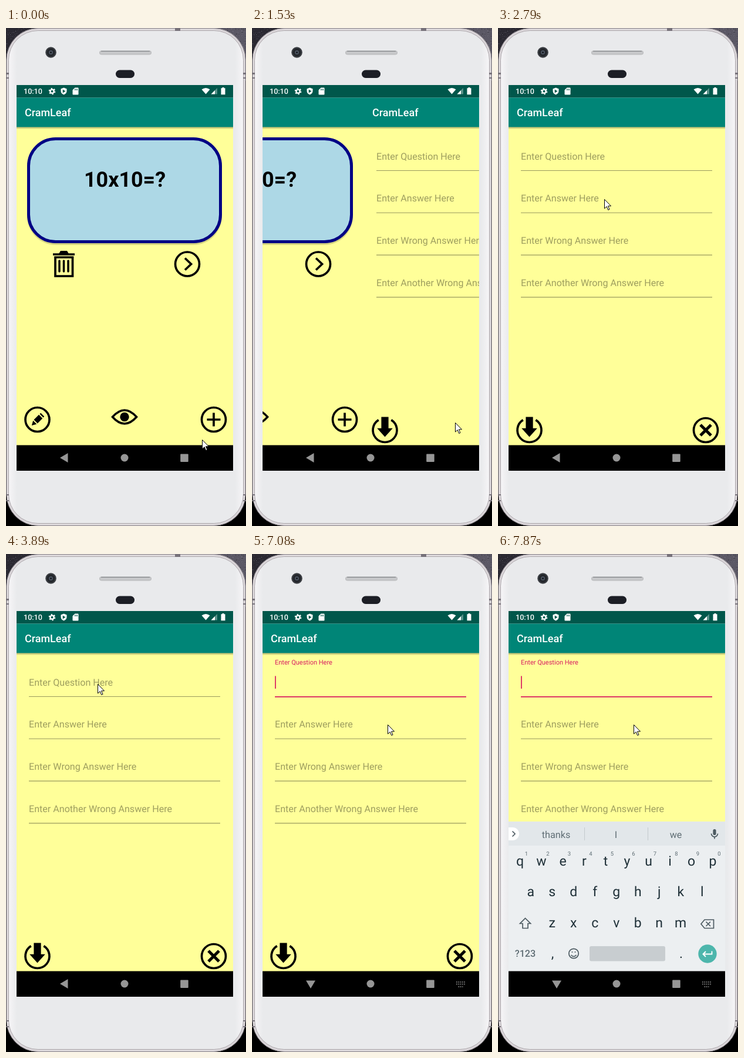
These frames come from a looping animation (409x847 px, 8 s). An HTML page:

```html
<!DOCTYPE html>
<html lang="en">
<head>
<meta charset="utf-8">
<title>Flash cards</title>
<style>
  html, body { margin: 0; width: 100%; height: 100%; overflow: hidden; background: #000; }
  svg { display: block; width: 100%; height: 100%; }
  text { font-family: Roboto, sans-serif; text-rendering: geometricPrecision; white-space: pre; }
  .mid { text-anchor: middle; }
  .icon { fill: none; stroke: #000; stroke-width: 3.7; }
  .solid { fill: #000; stroke: none; }
  .hint { font-size: 16.1px; fill: #9e9e5f; }
  .title { font-size: 17.96px; font-weight: 500; fill: #fff; }
  .key { font-size: 23px; fill: #1f3038; }
  .small { font-size: 9.5px; fill: #5f6d74; }
  .word { font-size: 16.2px; fill: #5f6d74; }
  .glyph { fill: none; stroke: #4c5a61; stroke-width: 1.7; }
</style>
</head>
<body>
<svg viewBox="0 0 409 847" preserveAspectRatio="none">
  <defs>
    <linearGradient id="shade" x2="0" y2="1">
      <stop stop-color="#000" stop-opacity=".3"/>
      <stop offset="1" stop-color="#000" stop-opacity="0"/>
    </linearGradient>
    <linearGradient id="face">
      <stop stop-color="#f6f5f7"/>
      <stop offset=".035" stop-color="#e9eaec"/>
      <stop offset=".965" stop-color="#e9eaec"/>
      <stop offset="1" stop-color="#f6f5f7"/>
    </linearGradient>
    <clipPath id="view"><path d="M18 118h369v592H18z"/></clipPath>
  </defs>

  <!-- wallpaper and phone -->
  <path fill="#2b2932" d="M0 0h205v90H0z"/>
  <path fill="#5b5865" d="M205 0h204v90H205z"/>
  <g id="grain"></g>
  <path d="M0 780h409v67H0z"/>
  <rect x=".8" y=".5" width="407.400" height="846" rx="54" fill="#d2cdd1" stroke="#8f8a8f"/>
  <rect x="2.500" y="2.500" width="404" height="842" rx="52" fill="none" stroke="#e6e2e5"/>
  <rect x="4.500" y="4.500" width="400" height="838" rx="50" fill="url(#face)" stroke="#b3aeb2"/>
  <path fill="#77727a" d="M288 0h9v5h-9zM0 76h5v3H0zM0 84h5v2H0zM404 76h5v3h-5zM404 84h5v2h-5zM0 793h5v2H0zM0 803h5v2H0zM404 793h5v2h-5zM404 803h5v2h-5z"/>
  <circle cx="76.500" cy="41.500" r="9.300" fill="#3b3e43"/>
  <circle cx="76.500" cy="41.500" r="7" fill="#23262b"/>
  <circle cx="76.500" cy="41.500" r="3.500" fill="#4b5360"/>
  <circle cx="76.500" cy="41.500" r="1.600" fill="#16191d"/>
  <rect x="159.300" y="38.800" width="88.400" height="6.400" rx="3.200" fill="#c6c7c9" stroke="#b4b5b7" stroke-width=".7"/>
  <path stroke="#7d7f82" d="M162 39.500h83"/>
  <rect x="187" y="71.500" width="32" height="13.500" rx="6.700" fill="#1c1e25"/>

  <!-- status bar -->
  <path fill="#00574b" d="M18 97h369v21.500H18z"/>
  <text x="30" y="112.200" font-size="12.57" font-weight="500" fill="#fff">10:10</text>
  <g fill="#fff">
    <circle cx="78.500" cy="107.700" r="3.100" fill="none" stroke="#fff" stroke-width="2.400"/>
    <circle cx="78.500" cy="107.700" r="4.900" fill="none" stroke="#fff" stroke-width="1.800" stroke-dasharray="2.5 2.63"/>
    <path fill-rule="evenodd" d="M98.500 101.500l5 2v3.600q0 4.600-5 6.400q-5-1.800-5-6.400v-3.600zM96.700 104.500v6l4.600-3z"/>
    <path fill-rule="evenodd" d="M117.500 101.500h5q1 0 1 1v10q0 1-1 1h-8q-1 0-1-1v-7zM117 103.500v2.500h1v-2.500zm2 0v2.500h1v-2.500zm2 0v2.500h1v-2.500z"/>
    <path d="M333.500 104.500q7-5 14 0l-7 8z"/>
    <path d="M360 102v10.500h-10.500z" opacity=".35"/>
    <path d="M356 106v6.500h-6.500z"/>
    <path d="M368.500 101h3v1.200h2v11h-7v-11h2z"/>
  </g>

  <!-- app -->
  <g clip-path="url(#view)">
    <path fill="#ff9" d="M18 168h369v542H18z"/>
    <path fill="#008577" d="M18 118.500h369v50H18z"/>
    <path fill="url(#shade)" d="M18 168.500h369v4H18z"/>

    <g id="deck">
      <text class="title" x="32" y="150">CramLeaf</text>
      <rect x="36" y="188" width="332" height="181" rx="49" opacity=".16"/>
      <rect x="38.500" y="188.500" width="327" height="175" rx="46" fill="#add8e6" stroke="#000084" stroke-width="5"/>
      <text class="mid" x="202.500" y="269.500" font-size="35.9" font-weight="700">10x10=?</text>
      <g class="icon">
        <path d="M80 385h37M84 390v32h29.500v-32z"/>
        <path class="solid" d="M90 384l3-5h11l3 5z"/>
        <path stroke-width="3.500" stroke-linecap="round" d="M91 396v18M98.500 396v18M106 396v18"/>
        <circle cx="309" cy="401.500" r="20.500"/>
        <path d="M305 391.500l10.500 10-10.500 10"/>
        <circle cx="53.500" cy="666" r="20.500"/>
        <path class="solid" d="M43.800 676l2.400-8.300 6 6zM47.500 666.300l8.500-8.500 6.200 6.200-8.500 8.500zM57.500 656.400l1.700-1.600 6 6-1.700 1.700z"/>
        <path stroke-width="3.500" d="M181.500 661.500q20.500-23 41 0q-20.500 23-41 0z"/>
        <circle class="solid" cx="202" cy="661.500" r="7.700"/>
        <circle cx="354" cy="666" r="20.500"/>
        <path d="M342.500 666h23M354 654.500v23"/>
      </g>
    </g>

    <g id="form">
      <path fill="#ff9" d="M18 172.500h369v537.500H18z"/>
      <text class="title" x="32" y="150">CramLeaf</text>
      <g id="fields"></g>
      <path id="focus" stroke="#d81b60" stroke-width="1.700" d="M39 242.800h326"/>
      <path id="caret" stroke="#d81b60" stroke-width="1.700" d="M39.900 207.500v21.500"/>
      <g class="icon">
        <path d="M42.700 666.600a20.500 20.500 0 1 0 21.600 0"/>
        <path class="solid" d="M47.400 661.500h12.200v19.300h7.200l-13.300 14.700-13.300-14.700h7.200z"/>
        <circle cx="354" cy="684" r="20.500"/>
        <path stroke-width="5" d="M345 675l18 18M363 675l-18 18"/>
      </g>
    </g>

    <g id="board">
      <path fill="#eceff1" d="M18 455h369v320H18z"/>
      <path fill="#e2e7ea" d="M18 455h369v41H18z"/>
      <path fill="#fff" d="M18 465h7a11 11 0 0 1 0 22h-7z"/>
      <path class="glyph" d="M24.500 471.500l4.500 4.500-4.500 4.500"/>
      <path stroke="#c3cacd" d="M147.500 465v22M255.500 465v22"/>
      <rect x="366.400" y="468" width="5.200" height="10" rx="2.600" fill="#4c5a61"/>
      <path class="glyph" stroke-width="1.500" d="M363.500 475.500a5.500 5.500 0 0 0 11 0M369 481v3.500"/>
      <path class="glyph" d="M46.500 619.500l9 9h-4.500v8h-9v-8h-4.500z"/>
      <path class="glyph" d="M352 622h15.500v14.500H352l-6-7.200zM354.500 625.500l7.500 7.500M362 625.500l-7.500 7.500"/>
      <circle class="glyph" cx="129" cy="679.500" r="8.200"/>
      <path class="glyph" d="M124.500 682q4.500 5 9 0M125.500 677h2M130.500 677h2"/>
      <rect x="156" y="667" width="129" height="25.500" rx="3" fill="#c8cdd0"/>
      <circle cx="357" cy="680" r="15.700" fill="#4db6ac"/>
      <path fill="none" stroke="#fff" stroke-width="1.900" d="M364.500 675.500v5h-14.500M354 676l-4.500 4.500 4.500 4.500"/>
    </g>
  </g>

  <!-- navigation bar -->
  <path d="M18 709.600h369V753H18z"/>
  <g fill="#969696">
    <path id="back"/>
    <circle cx="202" cy="731" r="6.500"/>
    <rect x="297.200" y="724.500" width="13.500" height="13.500" rx="1"/>
  </g>
  <path id="ime" fill="none" stroke="#969696" stroke-width="1.700" d="M348 728h15M348 731.500h15M351.500 736h8" stroke-dasharray="1.800 1.500"/>

  <path id="mouse" fill="#fff" stroke="#000" stroke-linejoin="round" d="M.5.5v15.500l3.700-3.400 2.500 5.900 2.300-1-2.500-5.700h5z"/>
</svg>

<script>
const LOOP = 8000;
const $ = id => document.getElementById(id);
const ns = "http://www.w3.org/2000/svg";

function add(parent, tag, attrs, content = "") {
  const el = document.createElementNS(ns, tag);
  for (const k in attrs) el.setAttribute(k, attrs[k]);
  el.textContent = content;
  return parent.appendChild(el);
}

// Speckled wallpaper behind the top corners
let seed = 7;
const random = () => (seed = seed * 16807 % 2147483647) / 2147483647;
for (let i = 0; i < 400; i++) {
  const x = Math.floor(random() * 36), y = Math.floor(random() * 36);
  add($("grain"), "path", {
    fill: random() < .5 ? "#000" : "#aaa6b8", opacity: random() * .4,
    d: `M${i % 2 ? x : 408 - x} ${y}h1v1h-1z`
  });
}

// Input fields
const fields = $("fields");
const hints = ["Enter Question Here", "Enter Answer Here", "Enter Wrong Answer Here", "Enter Another Wrong Answer Here"]
  .map((label, i) => {
    const y = i * 71.8;
    add(fields, "path", { stroke: "#99995f", "stroke-width": 1.1, d: `M39 ${242.5 + y}h326` });
    return add(fields, "text", { class: "hint", x: 39, y: 223.6 + y }, label);
  });

// Keyboard letters
const board = $("board");
const write = (cls, x, y, s) => add(board, "text", { class: cls + " mid", x, y }, s);
[["qwertyuiop", 37.5, 529.5], ["asdfghjkl", 55.8, 582], ["zxcvbnm", 92.2, 635]].forEach(([row, x, y], r) =>
  [...row].forEach((c, i) => {
    write("key", x + i * 36.5, y, c);
    if (!r) write("small", x + 11 + i * 36.5, 512.5, (i + 1) % 10);
  }));
["thanks", "I", "we"].forEach((w, i) => write("word", 99 + i * 102, 482.5, w));
write("word", 46.5, 685, "?123").setAttribute("font-weight", 500);
write("key", 93, 687, ",");
write("key", 312, 687, ".");

// Stepped tracks: [time, value...], each value holds until the next time
const pointer = [
  [0, 334, 700], [150, 334, 678], [300, 339, 675], [420, 346, 673], [730, 346, 671],
  [2330, 208, 419], [2480, 191, 323], [2790, 181, 291], [2910, 168, 255], [3030, 158, 226],
  [3180, 156, 221], [3330, 156, 220], [3890, 156, 221], [4610, 155, 221], [6020, 155, 223],
  [6270, 155, 224], [6420, 171, 233], [6540, 194, 248], [6690, 224, 280], [6840, 231, 290]
];
const slide = [[0, 0], [1410, .22], [1530, .52], [1650, .82], [1770, 1]];
const lift = [[0, 0], [4610, .04], [5040, .3], [5160, .8], [5280, 1]];
const caret = [[0, 0], [4760, 1], [6840, 0], [6960, 1], [7350, 0], [7870, 1]];
const rise = [[0, 0], [7200, .4], [7350, .85], [7470, 1]];

const at = (track, t) => track.findLast(k => k[0] <= t).slice(1);
const ease = p => (1 - Math.cos(Math.PI * p)) / 2;
const mix = (a, b, p) => a + (b - a) * p;
const move = (id, x, y) => $(id).setAttribute("transform", `translate(${x} ${y})`);
const show = (id, v) => $(id).setAttribute("opacity", +v);

function draw(t) {
  const dx = Math.round(369 * ease(at(slide, t)[0]));
  move("deck", -dx, 0);
  move("form", 369 - dx, 0);

  const p = at(lift, t)[0], q = ease(p);
  const rgb = [[158, 216], [158, 27], [95, 96]].map(([a, b]) => Math.round(mix(a, b, q)));
  hints[0].setAttribute("y", mix(223.6, 187.8, q));
  hints[0].style.fontSize = mix(16.1, 11, q) + "px";
  hints[0].style.fill = `rgb(${rgb})`;
  show("focus", p > 0);
  show("caret", at(caret, t)[0]);

  const k = at(rise, t)[0];
  show("board", k);
  move("board", 0, 60 * (1 - k));
  const typing = t >= 6960;
  show("ime", typing);
  $("back").setAttribute("d", typing ? "M92 725.5h16l-8 13.5z" : "M92 731l13.5-8v16z");

  move("mouse", ...at(pointer, t));
}

const start = performance.now();
(function tick() {
  draw((performance.now() - start) % LOOP);
  requestAnimationFrame(tick);
})();
</script>
</body>
</html>
```
